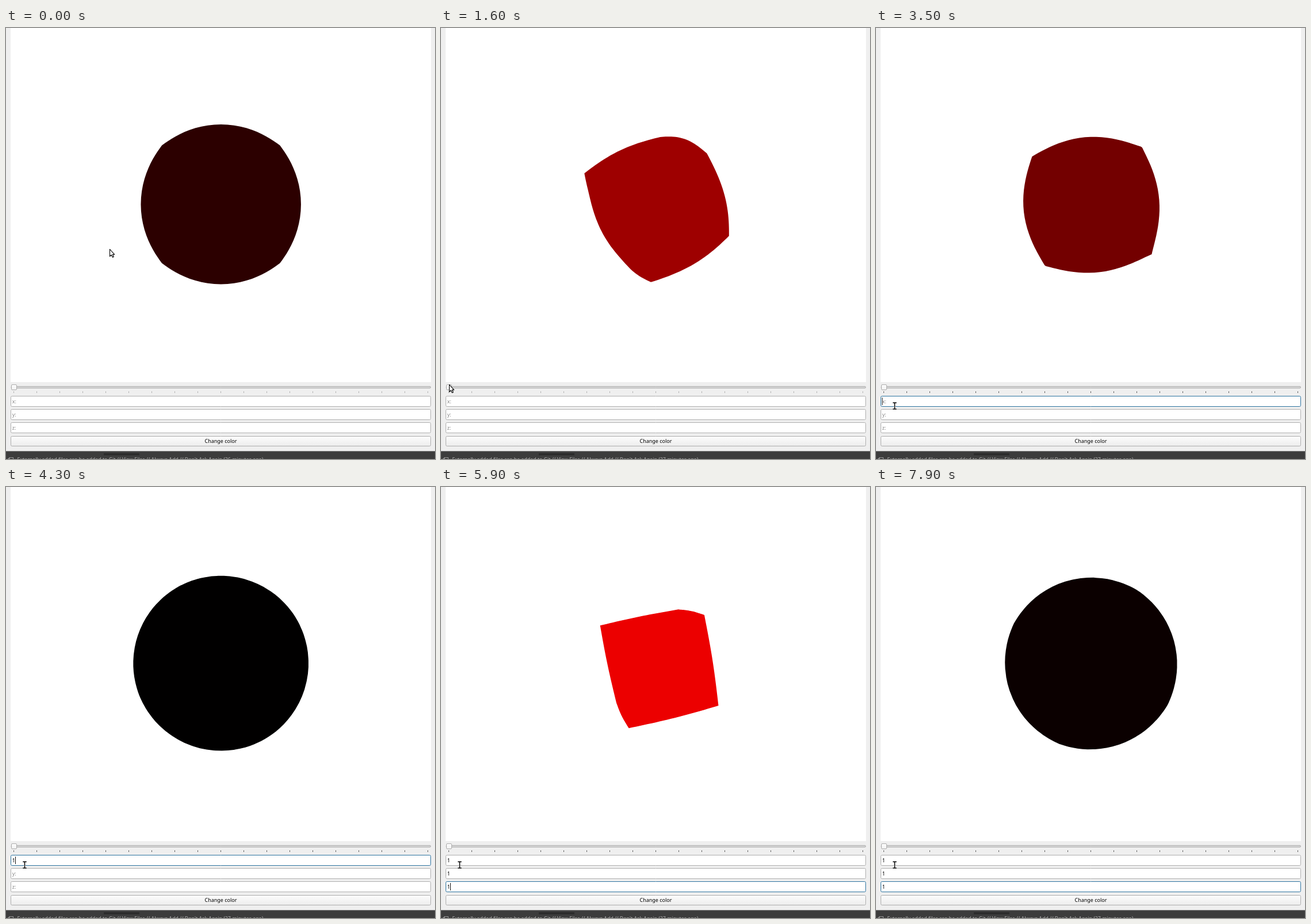
An HTML page with a canvas for the animation above (8000 ms loop, 746 by 751 pixels).

```html
<!DOCTYPE html>
<html lang="en">
<head>
<meta charset="utf-8">
<title>Cube to sphere</title>
<style>
html, body { margin: 0; width: 100%; height: 100%; overflow: hidden; background: #efefef; }
main { position: relative; width: 100%; height: 100%; overflow: hidden; contain: strict; }
canvas { position: absolute; left: 0; top: 0; }
div { position: absolute; height: 20px; font: 9px/20px "Noto Sans", sans-serif; white-space: pre; color: #000; }
.field { left: 10.7px; }
.hint { color: #858585; }
#button { left: 8px; width: 731px; top: 710px; text-align: center; }
#status { left: 19.5px; top: 741.5px; color: #b4b4b4; font-size: 8.8px; }
</style>
</head>
<body>
<main>
<canvas id="stage" width="746" height="751"></canvas>
<div class="field" style="top:640.5px"></div>
<div class="field" style="top:663.5px"></div>
<div class="field" style="top:686.5px"></div>
<div id="button">Change color</div>
<div id="status"></div>
</main>
<script>
const ctx = document.getElementById('stage').getContext('2d');
const fields = [...document.querySelectorAll('.field')];
const status = document.getElementById('status');

const LOOP = 8000, STEP = 100;
const CX = 373.7, CY = 307.2, FOCAL = 748.5, DIST = 5, GRID = 24;

// time, timer ticks
const TICKS = [[0, 0], [1600, 40], [2400, 60], [2500, 60], [3500, 85], [5100, 125], [5900, 146], [7100, 175], [7900, 195]];
// time, pointer x, y
const POINTER = [[0, 180, 385], [200, 180, 385], [900, 18, 635], [1200, 14, 621], [1900, 14, 621], [2300, 32.5, 658.5]];
// when each field gets the focus and its digit
const FOCUS = [2300, 4500, 5200];
const TYPED = [4100, 4900, 5800];
const NAMES = ['x:', 'y:', 'z:'];
const BLINK = 550;

function along(keys, t, col) {
  let i = 0;
  while (i < keys.length - 2 && t > keys[i + 1][0]) i++;
  const a = keys[i], b = keys[i + 1];
  const k = Math.min(1, Math.max(0, (t - a[0]) / (b[0] - a[0])));
  return a[col] + (b[col] - a[col]) * k;
}

function rect(x, y, w, h, color) {
  ctx.fillStyle = color;
  ctx.fillRect(x, y, w, h);
}

function box(x, y, w, h, r, fill, line) {
  ctx.beginPath();
  ctx.roundRect(x, y, w, h, r);
  ctx.fillStyle = fill;
  ctx.fill();
  ctx.strokeStyle = line;
  ctx.lineWidth = 1;
  ctx.stroke();
}

function shade(y, h, top, bottom) {
  const g = ctx.createLinearGradient(0, y, 0, y + h);
  g.addColorStop(0, top);
  g.addColorStop(1, bottom);
  return g;
}

function drawSolid(tick) {
  const round = 0.5 + 0.5 * Math.cos(tick / 15 - 0.858);
  const turn = tick * Math.PI / 18, third = Math.PI * 2 / 3;
  // rotation about the (1, 1, 1) axis
  const [c, p, q] = [0, -third, third].map(o => (1 + 2 * Math.cos(turn + o)) / 3);

  const project = v => {
    const k = 1 - round + round / Math.hypot(...v);
    const [x, y, z] = v.map(n => n * k);
    const s = FOCAL / (DIST - (q * x + p * y + c * z));
    return [CX + s * (c * x + q * y + p * z), CY - s * (p * x + c * y + q * z)];
  };

  ctx.beginPath();
  for (let axis = 0; axis < 3; axis++) {
    for (const side of [-0.5, 0.5]) {
      const pts = [];
      for (let i = 0; i <= GRID; i++) {
        for (let j = 0; j <= GRID; j++) {
          const v = [];
          v[axis] = side;
          v[(axis + 1) % 3] = i / GRID - 0.5;
          v[(axis + 2) % 3] = j / GRID - 0.5;
          pts.push(project(v));
        }
      }
      const row = GRID + 1;
      for (let i = 0; i < GRID; i++) {
        for (let j = 0; j < GRID; j++) {
          const n = i * row + j;
          const quad = [pts[n], pts[n + 1], pts[n + row + 1], pts[n + row]];
          const [a, b, d, e] = quad;
          const area = (d[0] - a[0]) * (e[1] - b[1]) - (d[1] - a[1]) * (e[0] - b[0]);
          if (area < 0) quad.reverse();
          quad.forEach((pt, m) => m ? ctx.lineTo(...pt) : ctx.moveTo(...pt));
          ctx.closePath();
        }
      }
    }
  }
  ctx.fillStyle = `rgb(${Math.round(255 * (1 - round))},0,0)`;
  ctx.fill();
}

function drawSlider(active) {
  box(9, 624.5, 729.5, 3, 1.5, '#d6d6d6', '#b0b0b0');
  for (let i = 0; i < 19; i++) rect(13 + i * 40, 633, 1, 3, active ? '#5c5c5c' : '#b0b0b0');
  box(9.5, 621.5, 9, 9, 1.5, shade(621, 9, '#ffffff', '#f1f1f1'), '#adadad');
}

function drawFields(t) {
  const focus = FOCUS.filter(f => t >= f).length - 1;
  fields.forEach((el, i) => {
    const typed = t >= TYPED[i], y = 641.5 + i * 23;
    box(8.5, y, 730, 18, 2, '#fff', i === focus ? '#2c739f' : '#aeaeae');
    el.textContent = typed ? '1' : NAMES[i];
    el.className = typed ? 'field' : 'field hint';
    if (i !== focus) return;
    const since = t - (typed ? TYPED[i] : FOCUS[i]);
    if (Math.floor(since / BLINK) % 2 === 0) rect(typed ? 16 : 10.5, y + 2.5, 1, 13, '#111');
  });
  box(8.5, 711.5, 730, 17, 2, shade(711, 18, '#fdfdfd', '#ececec'), '#aeaeae');
}

function drawFooter(t) {
  rect(0, 737.5, 746, 14, '#3c3c3c');
  rect(0, 737.5, 746, 1, '#505050');
  rect(170, 741, 62, 3.5, '#2b2b2b');
  ctx.strokeStyle = '#a0a0a0';
  ctx.lineWidth = 0.9;
  ctx.strokeRect(5.5, 748.5, 7, 7);
  ctx.strokeRect(3.5, 750.5, 3, 7);
  const min = t < 1300 ? 26 : 27;
  status.textContent = `Externally added files can be added to Git // View Files // Always Add // Don't Ask Again (${min} minutes ago)`;
}

function drawPointer(t) {
  const arrow = t < 2200;
  ctx.save();
  ctx.translate(along(POINTER, t, 1), along(POINTER, t, 2));
  ctx.lineJoin = 'round';
  const path = new Path2D(arrow
    ? 'M.5 .5V13L3.3 10.4 5.3 14.6 7.3 13.7 5.4 9.6H8.7Z'
    : 'M-3.2-5.5H3.2M0-5.5V5.5M-3.2 5.5H3.2');
  if (arrow) {
    ctx.fillStyle = '#fff';
    ctx.fill(path);
  } else {
    ctx.strokeStyle = '#fff';
    ctx.lineWidth = 3;
    ctx.stroke(path);
  }
  ctx.strokeStyle = '#000';
  ctx.lineWidth = arrow ? 1.1 : 1.5;
  ctx.stroke(path);
  ctx.restore();
}

function draw(t) {
  rect(0, 0, 746, 751, '#efefef');
  rect(8, 0, 731, 617, '#fff');
  drawSolid(Math.round(along(TICKS, t, 1)));
  drawSlider(t >= FOCUS[0]);
  drawFields(t);
  drawFooter(t);
  drawPointer(t);
}

let shown = -1;
function loop() {
  const step = Math.floor(performance.now() % LOOP / STEP);
  if (step !== shown) draw(step * STEP);
  shown = step;
  requestAnimationFrame(loop);
}
loop();
</script>
</body>
</html>
```
